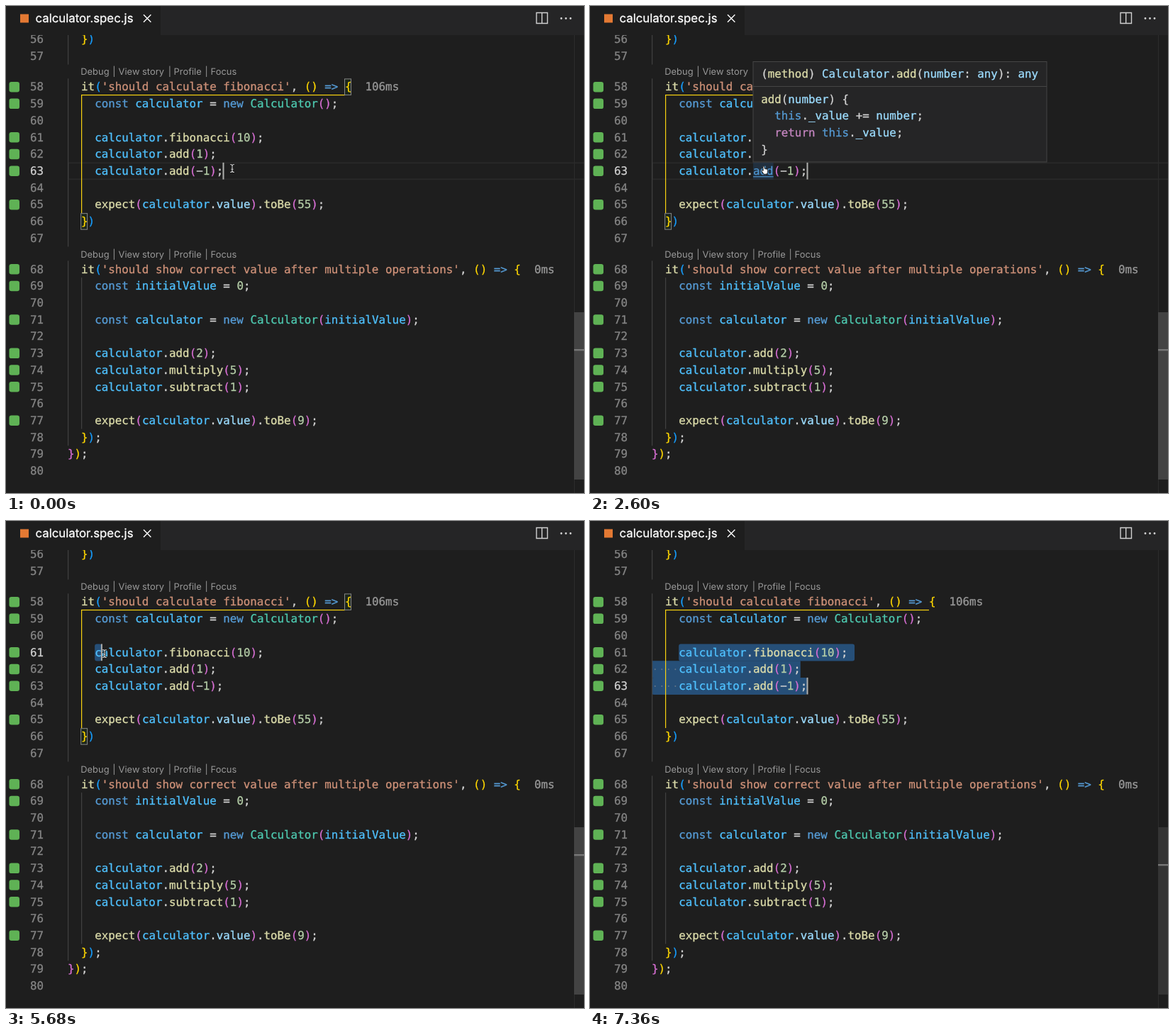
Write an HTML page that moves like this. It is 815 px wide and 687 px high and loops after 8000 ms.

```html
<!DOCTYPE html>
<html lang="en">
<head>
<meta charset="utf-8">
<title>Editor</title>
<style>
  html, body { margin: 0; width: 100%; height: 100%; overflow: hidden; background: #1e1e1e; }
  svg { display: block; width: 100%; height: 100%; }
  text { text-rendering: geometricPrecision; white-space: pre; stroke-width: .3px; }
  .code { font: 15.84px "DejaVu Sans Mono", monospace; }
  .lens { font: 12.9px Inter, sans-serif; fill: #999; }
  .title { font: 16.8px Inter, sans-serif; fill: #fff; stroke: #fff; }
</style>
</head>
<body>
<svg id="stage" viewBox="0 0 815 687"></svg>
<script>
const LOOP = 8000, CHAR = 9.535, LEFT = 87, ROW = 23.72, BASE = 17.15;
const stage = document.getElementById('stage');

function add(parent, tag, attrs, text) {
  const el = document.createElementNS('http://www.w3.org/2000/svg', tag);
  set(el, attrs);
  if (text !== undefined) el.textContent = text;
  parent.appendChild(el);
  return el;
}
function set(el, attrs) {
  for (const key in attrs) el.setAttribute(key, attrs[key]);
}
function show(el, on) {
  el.style.display = on ? '' : 'none';
}
const group = (parent = stage) => add(parent, 'g', {});
const rect = (parent, x, y, width, height, fill, more) =>
  add(parent, 'rect', { x, y, width, height, fill, ...more });
const colX = c => LEFT + c * CHAR;
// A thin outline gives the text its slightly heavy weight
const ink = color => ({ fill: color, stroke: color });

function rowTop(n) {
  if (n < 58) return 35.1 + (n - 56) * ROW;
  if (n < 68) return 102.3 + (n - 58) * ROW;
  return 359.4 + (n - 68) * ROW;
}

// Code text and its colours
const PLAIN = '#d4d4d4', FUNC = '#dcdcaa', WORD = '#569cd6', PROP = '#9cdcfe';
const BRACKETS = ['#ffd700', '#da70d6', '#179fff'];
const lines = [
  '  })', '',
  "  it('should calculate fibonacci', () => {",
  '    const calculator = new Calculator();', '',
  '    calculator.fibonacci(10);',
  '    calculator.add(1);',
  '    calculator.add(−1);', '',
  '    expect(calculator.value).toBe(55);',
  '  })', '',
  "  it('should show correct value after multiple operations', () => {",
  '    const initialValue = 0;', '',
  '    const calculator = new Calculator(initialValue);', '',
  '    calculator.add(2);',
  '    calculator.multiply(5);',
  '    calculator.subtract(1);', '',
  '    expect(calculator.value).toBe(9);',
  '  });', '});', ''
];
let depth = 4;
function codeColor(s) {
  if (/^[({]/.test(s)) return BRACKETS[depth++ % 3];
  if (/^[)}]/.test(s)) return BRACKETS[--depth % 3];
  if (s[0] === "'") return '#ce9178';
  if (/^\d/.test(s)) return '#b5cea8';
  if (/^(const|new|=>)$/.test(s)) return WORD;
  if (/^(it|fibonacci|add|expect|toBe|multiply|subtract)$/.test(s)) return FUNC;
  if (s === 'Calculator') return '#4ec9b0';
  if (s === 'value') return PROP;
  return /^\w/.test(s) ? '#4fc1ff' : PLAIN;
}
function hoverColor(s) {
  if (/^(add|method)$/.test(s)) return FUNC;
  if (s === 'this') return WORD;
  if (s === 'return') return '#c586c0';
  return /^\w/.test(s) ? PROP : PLAIN;
}
function drawCode(parent, line, x, y, color) {
  const text = add(parent, 'text', { class: 'code', y });
  for (const m of line.matchAll(/'[^']*'|\w+|=>|[^\s\w]/g))
    add(text, 'tspan', { x: x + m.index * CHAR, ...ink(color(m[0])) }, m[0]);
  return text;
}

// Layers, back to front
const current = group();
rect(current, 88, .5, 740, ROW - .7, 'none', { stroke: '#2a2a2a', 'stroke-width': 1.6 });
const linkBack = rect(stage, colX(15), rowTop(63), CHAR * 3, ROW, '#264f78', { opacity: .35 });
const selection = [61, 62, 63].map(n =>
  rect(stage, colX(n === 61 ? 4 : 0), rowTop(n), 0, ROW + .3, '#264f78', { rx: n === 62 ? 1 : 3 }));
const dots = [62, 63].map(n => {
  const g = group();
  for (let c = 0; c < 4; c++)
    add(g, 'circle', { cx: colX(c + .5), cy: rowTop(n) + 12, r: 1, fill: '#66788a' });
  return g;
});

function guide(x, from, to, fill) {
  const y = rowTop(from);
  rect(stage, x, y, 1.2, rowTop(to) + ROW - y, fill);
}
guide(87, 56, 57, '#404040');
guide(87, 58, 67, '#404040');
guide(87, 68, 78, '#404040');
guide(106, 69, 77, '#404040');
guide(106, 59, 65, '#f8d210');
rect(stage, 106, 125, 372, 1.2, '#f8d210');

const boxes = group();
for (const [c, n] of [[41, 58], [2, 66]])
  rect(boxes, colX(c) - .4, rowTop(n) + .6, CHAR - .6, ROW - 1.2, '#1c261c', { stroke: '#888' });

const numbers = {}, rows = {};
lines.forEach((line, i) => {
  const n = 56 + i, y = rowTop(n) + BASE;
  numbers[n] = add(stage, 'text', { class: 'code', x: 34, y, ...ink('#858585') }, n);
  rows[n] = drawCode(stage, line, LEFT, y, codeColor);
});
const link = [...rows[63].children].find(t => t.textContent === 'add');
const linkLine = rect(stage, colX(15), 240.2, CHAR * 3, 1.2, '#4e94ce');
for (const [c, n, label] of [[44, 58, '106ms'], [69, 68, '0ms']])
  add(stage, 'text', { class: 'code', x: colX(c), y: rowTop(n) + BASE, ...ink('#999') }, label);

for (const n of [58, 59, 61, 62, 63, 65, 68, 69, 71, 73, 74, 75, 77])
  rect(stage, 4.5, rowTop(n) + 4.6, 14.5, 14.5, '#5fb255', { rx: 3.2 });

for (const y of [97.3, 355]) {
  const lens = add(stage, 'text', { class: 'lens', y });
  const parts = [['Debug', 105.3], ['|', 150.3], ['View story', 158.6], ['|', 228.7],
    ['Profile', 236.6], ['|', 280.5], ['Focus', 288.6]];
  for (const [word, x] of parts) add(lens, 'tspan', { x }, word);
}
const caret = rect(stage, 0, 0, 2, ROW, '#aeafad');

// Tab bar
rect(stage, 0, 0, 815, 41, '#252526');
rect(stage, 0, 0, 218, 41, '#1e1e1e');
rect(stage, 20, 11.5, 12, 12, '#e37933');
add(stage, 'text', { class: 'title', x: 41.5, y: 23.4 }, 'calculator.spec.js');
const iconLine = { fill: 'none', stroke: '#d0d0d0', 'stroke-width': 1.4 };
add(stage, 'path', { d: 'M194 12.3l10.4 10.4M204.4 12.3l-10.4 10.4', ...iconLine, stroke: '#fff' });
add(stage, 'path', { d: 'M748 9.5h15.5v15h-15.5zM755.7 9.5v15', ...iconLine });
for (const cx of [783, 789.5, 796]) add(stage, 'circle', { cx, cy: 17.5, r: 1.4, fill: '#d0d0d0' });

// Scroll bar
rect(stage, 801, 41, 1, 646, '#2c2c2c');
const slider = rect(stage, 801, 432, 14, 236, '#434343');
const mark = rect(stage, 801, 484, 14, 2.4, '#777');

// Hover card
const card = group();
rect(card, 230, 78.5, 414, 141.5, '#252526', { stroke: '#454545' });
rect(card, 230, 113, 414, 1, '#454545');
[
  ['(method) Calculator.add(number: any): any', 101.3],
  ['add(number) {', 136.5],
  ['  this._value += number;', 160.2],
  ['  return this._value;', 184],
  ['}', 207.7]
].forEach(([line, y]) => drawCode(card, line, 241.2, y, hoverColor));

// Pointers, centred on their position
const mouse = group();
const beam = group(mouse), hand = group(mouse), arrow = group(mouse);
const beamPath = 'M-2.8-5.5Q0-5.5 0-3.5Q0-5.5 2.8-5.5M0-3.5V3.5M-2.8 5.5Q0 5.5 0 3.5Q0 5.5 2.8 5.5M-1.5 1.2H1.5';
add(beam, 'path', { d: beamPath, fill: 'none', stroke: '#111', 'stroke-width': 2.4 });
add(beam, 'path', { d: beamPath, fill: 'none', stroke: '#d8d8d8', 'stroke-width': 1.1 });
add(hand, 'path', {
  d: 'M-2.4-4.6Q-1.3-6.2-.4-4.6L.2-1.6Q3.6-1.8 4.4 0Q4.8 3 3.2 6H-1.4Q-2.6 3.2-4.6 1.2Q-4.2-.2-2 1Z',
  fill: '#fff', stroke: '#111', 'stroke-width': .9
});
add(arrow, 'path', {
  d: 'M-3-6V4L-.8 2L.8 5.6L2.4 4.9L.9 1.5H4Z',
  fill: '#111', stroke: '#eee', 'stroke-width': 1
});

// Pointer moves: start, end, steps, then the points passed at even intervals
const moves = [
  [50, 800, 14, [319, 229], [290, 226], [240, 230], [241, 236]],
  [2600, 3360, 12, [241, 236], [262, 217], [279, 204], [288, 200]],
  [3410, 4170, 14, [288, 200], [281, 170], [347, 165], [326, 195], [310, 197]],
  [4230, 4400, 4, [310, 197], [434, 197]],
  [4570, 4810, 5, [434, 197], [453, 233]],
  [4930, 5330, 8, [453, 233], [300, 215], [109, 190]],
  [5390, 6140, 13, [109, 190], [126, 187], [150, 187], [221, 217], [335, 238]],
  [6490, 6950, 9, [335, 238], [450, 246], [620, 249]]
];
const drag = moves[6];

function along(points, p) {
  const s = p * (points.length - 1);
  const i = Math.min(Math.floor(s), points.length - 2);
  return points[i].map((v, k) => v + (points[i + 1][k] - v) * (s - i));
}
function stepOf([start, end, steps], t) {
  const k = Math.floor((t - start) / (end - start) * (steps - 1) + 1e-6);
  return Math.min(k, steps - 1) + 1;
}
function mouseAt(t) {
  let move = moves[0];
  for (const m of moves) if (t >= m[0]) move = m;
  const p = t < move[0] ? 0 : stepOf(move, t) / move[2];
  return along(move.slice(3), p);
}
// The caret trails the pointer by one step while dragging
function caretAt(t) {
  if (t < drag[0] || t >= drag[1]) return [63, 23];
  const [x, y] = along(drag.slice(3), (stepOf(drag, t) - 1) / drag[2]);
  const row = Math.max(61, Math.min(63, 58 + Math.floor((y - rowTop(58)) / ROW)));
  const col = Math.min(Math.round((x - LEFT) / CHAR), lines[row - 56].length);
  return [row, row === 61 ? Math.max(4, col) : col];
}

function render(t) {
  const [row, col] = caretAt(t);
  const selecting = t >= drag[0] && (row > 61 || col > 4);

  for (let n = 61; n < 64; n++) {
    set(numbers[n], ink(n === row ? '#d0d0d0' : '#858585'));
    const first = n === 61 ? 4 : 0;
    const last = n === row ? col : lines[n - 56].length + (n === 61 ? 1 : 0);
    const on = selecting && n <= row;
    show(selection[n - 61], on);
    if (on) selection[n - 61].setAttribute('width', Math.max(0, last - first) * CHAR);
    if (n > 61) show(dots[n - 62], on);
  }
  set(caret, { x: colX(col) - .8, y: rowTop(row) });
  set(current, { transform: `translate(0 ${rowTop(row)})` });
  show(current, !selecting);
  show(boxes, t < 6080);
  mark.setAttribute('y', 484 - (63 - row) * 7);
  slider.setAttribute('fill', t >= 7360 ? '#343434' : '#434343');

  const linked = t >= 860 && t < 4630;
  show(linkBack, linked);
  show(linkLine, linked);
  set(link, ink(linked ? '#4e94ce' : FUNC));

  show(card, t >= 1040 && t < 4630);
  card.setAttribute('opacity', t < 1100 ? .5 : 1);

  const [x, y] = mouseAt(t);
  const onCard = linked && y < 220;
  show(beam, !linked);
  show(hand, linked && !onCard);
  show(arrow, onCard);
  show(mouse, t < 6950);
  set(mouse, { transform: `translate(${x} ${y})` });
}

function tick() {
  render(performance.now() % LOOP);
  requestAnimationFrame(tick);
}
tick();
</script>
</body>
</html>
```
